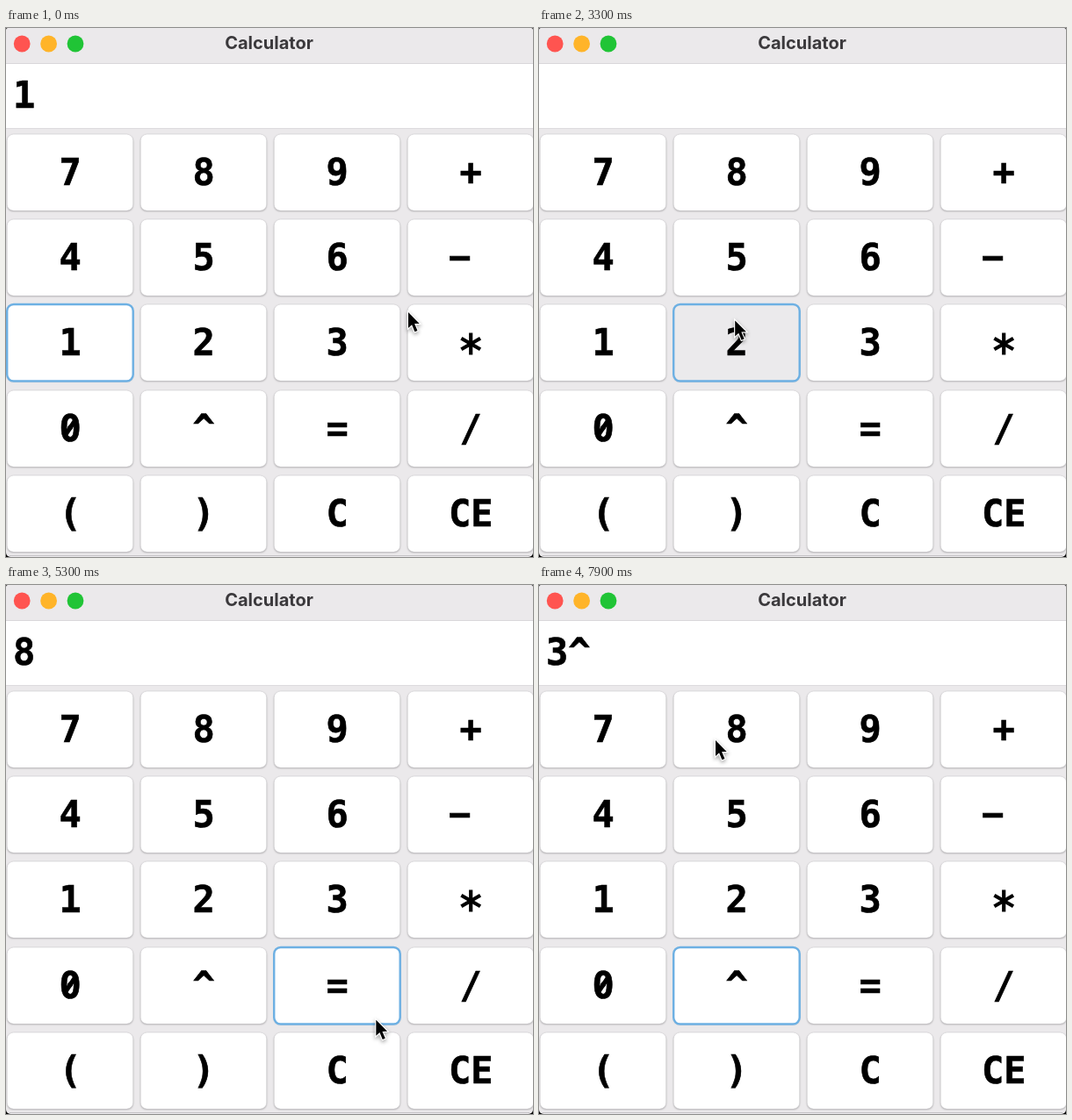
These frames come from a looping animation (600 px wide and 603 px high, 8 s). An HTML page with a canvas:

```html
<!DOCTYPE html>
<html lang="en">
<head>
<meta charset="utf-8">
<title>Calculator</title>
<style>
  html, body { margin: 0; height: 100%; overflow: hidden; background: #ebe9eb; }
  canvas { display: block; }
</style>
</head>
<body>
<canvas id="stage" width="600" height="603"></canvas>
<script>
const ctx = document.getElementById('stage').getContext('2d');
const KEYS = [...'789+456\u2212123*0^=/()C', 'CE'];
const CHAR = 25.28, STEP = 100, LOOP = 80;
const OPS = { '*': (a, b) => a * b, '^': (a, b) => a ** b };

const corner = i => [1.2 + i % 4 * 152, 121 + Math.floor(i / 4) * 97.2];

// The pointer's journey; times count steps of 100 ms.
const via = (time, x, y) => ({ arrive: time, leave: time, x, y });
const click = (key, arrive, leave, dx = -7, dy = -7) => {
  const [x, y] = corner(KEYS.indexOf(key));
  return { key, arrive, leave, x: x + 72 + dx, y: y + 44 + dy };
};
const STOPS = [
  via(0, 457, 322),
  click('*', 4, 8),
  click('5', 12, 13),
  click('=', 16, 19, 20, 2),
  click('C', 23, 25),
  click('2', 32, 34, -3, -28),
  click('^', 37, 38, 1, -17),
  click('3', 43, 47, -29, 14),
  click('=', 51, 52, 8, 20),
  click('CE', 58, 60, -29, -21),
  click('3', 64, 66),
  click('^', 70, 72, 21, 13),
  via(75, 300, 271),
  via(79, 200, 175)
];

function pointerAt(t) {
  const i = STOPS.findIndex(s => s.arrive >= t);
  const to = STOPS[i], from = STOPS[i - 1] ?? to;
  const k = Math.max(0, (t - from.leave) / Math.max(1, to.arrive - from.leave));
  const ease = 1 - (1 - k) ** 2;
  return [from.x + (to.x - from.x) * ease, from.y + (to.y - from.y) * ease];
}

function enter(text, key) {
  if (key[0] === 'C') return '';
  if (key !== '=') return text + key;
  const [a, op, b] = text;
  return String(OPS[op](+a, +b));
}

// A key is held for two steps, takes focus after one and acts on release.
function stateAt(t) {
  const state = { text: '1', focus: '1', held: null };
  for (const { key, arrive } of STOPS) {
    if (!key || t < arrive) continue;
    if (t > arrive) state.focus = key;
    if (t < arrive + 2) state.held = key;
    else state.text = enter(state.text, key);
  }
  return state;
}

function rect(color, x, y, w, h) {
  ctx.fillStyle = color;
  ctx.fillRect(x, y, w, h);
}

function rounded(x, y, w, h, r) {
  ctx.beginPath();
  ctx.roundRect(x, y, w, h, r);
}

function shadow(color, blur, dy) {
  ctx.shadowColor = color;
  ctx.shadowBlur = blur;
  ctx.shadowOffsetY = dy;
}

function line(width, x0, y0, x1, y1) {
  ctx.lineWidth = width;
  ctx.beginPath();
  ctx.moveTo(x0, y0);
  ctx.lineTo(x1, y1);
  ctx.stroke();
}

function asterisk(x, y) {
  for (let a = Math.PI / 6; a < Math.PI; a += Math.PI / 3) {
    const dx = 12.5 * Math.cos(a), dy = 12.5 * Math.sin(a);
    line(4.2, x - dx, y - dy, x + dx, y + dy);
  }
}

function write(text, left, baseline) {
  ctx.font = 'bold 42px "DejaVu Sans Mono", monospace';
  ctx.textAlign = 'left';
  ctx.fillStyle = ctx.strokeStyle = '#000';
  [...text].forEach((c, i) => {
    const x = left + i * CHAR, mid = x + CHAR / 2;
    if (c === '*') return asterisk(mid, baseline - 13);
    ctx.fillText(c, x, baseline);
    ctx.lineWidth = 0.6;
    ctx.strokeText(c, x, baseline);
    if (c === '0') line(5, mid - 5, baseline - 8, mid + 5, baseline - 23);
  });
}

function button(label, i, pressed, focused) {
  const [x, top] = corner(i), y = Math.round(top);
  ctx.save();
  shadow('rgba(0,0,0,.3)', 2, 1);
  ctx.fillStyle = pressed ? '#ebeaec' : '#fff';
  rounded(x, y, 143.5, 87, 7);
  ctx.fill();
  ctx.restore();
  ctx.lineWidth = focused ? 2.4 : 0.6;
  ctx.strokeStyle = focused ? '#6db0e3' : '#cfcdd0';
  rounded(x, y, 143.5, 87.5, 7.5);
  ctx.stroke();
  // The minus label carries a trailing space.
  const cells = label === '\u2212' ? 2 : label.length;
  write(label, x + 72 - cells * CHAR / 2, y + 58);
}

function pointer(x, y) {
  ctx.save();
  ctx.translate(x + 1, y + 2);
  ctx.scale(0.95, 0.95);
  ctx.beginPath();
  [[0, 0], [0, 19], [4.3, 15], [7.8, 23.4], [11, 22], [7.5, 13.8], [13.4, 13.6]]
    .forEach(p => ctx.lineTo(...p));
  ctx.closePath();
  ctx.lineWidth = 2.4;
  ctx.strokeStyle = '#fff';
  shadow('rgba(0,0,0,.4)', 4, 2);
  ctx.stroke();
  shadow('transparent', 0, 0);
  ctx.fillStyle = '#000';
  ctx.fill();
  ctx.restore();
}

function windowFrame() {
  rect('#000', 0, 0, 600, 603);
  ctx.fillStyle = '#ebe9eb';
  rounded(0, 0, 600, 603, [2, 2, 5, 5]);
  ctx.fill();
  rect('#c4c2c5', 4, 601, 592, 1);
  rect('#d9d7da', 0, 40, 600, 1);
  rect('#fff', 0, 41, 600, 73);
  rect('#dddbde', 0, 114, 600, 1);
  ['#ff5450', '#ffb429', '#20c436'].forEach((color, i) => {
    ctx.beginPath();
    ctx.arc(18.2 + i * 30.4, 18, 9.4, 0, 7);
    ctx.fillStyle = color;
    ctx.fill();
  });
  ctx.font = 'bold 20px Inter, sans-serif';
  ctx.textAlign = 'center';
  ctx.fillStyle = '#3b393c';
  ctx.fillText('Calculator', 299.5, 24);
}

function draw(t) {
  const { text, focus, held } = stateAt(t);
  windowFrame();
  write(text, 8, 91);
  KEYS.forEach((k, i) => button(k, i, k === held, k === focus));
  pointer(...pointerAt(t));
}

function tick() {
  draw(Math.floor(performance.now() / STEP) % LOOP);
  requestAnimationFrame(tick);
}
tick();
</script>
</body>
</html>
```
